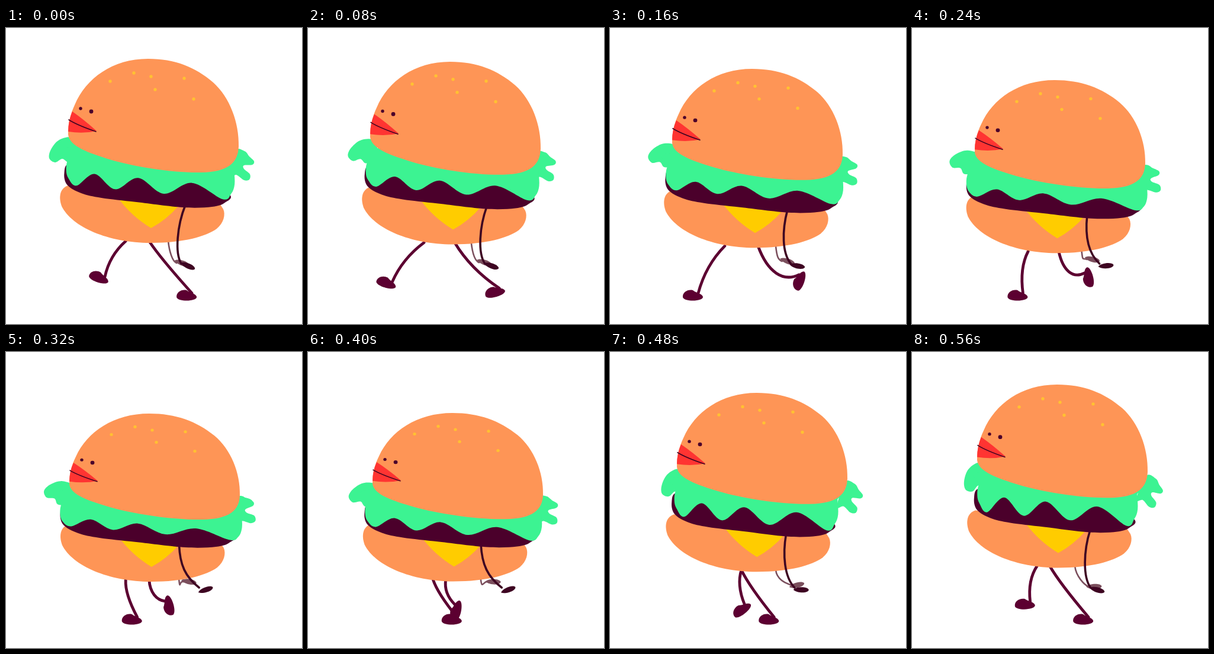
Animation, 500 px wide and 500 px high, one loop 640 ms. Source, as an HTML page with a canvas:

```html
<!DOCTYPE html>
<html lang="en">
<head>
<meta charset="utf-8">
<title>Walking burger</title>
<style>
  html, body { margin: 0; width: 100%; height: 100%; overflow: hidden; background: #fff; }
  canvas { display: block; width: 100vw; height: 100vh; object-fit: contain; }
</style>
</head>
<body>
<canvas id="stage" width="500" height="500"></canvas>
<script>
const ctx = document.getElementById('stage').getContext('2d');
const STEP = 80, STEPS = 8, CENTER = 240;
const ORANGE = '#fe9556', GREEN = '#3cf392', YELLOW = '#ffcc00', RED = '#ff3432',
      SEED = '#ffc132', PATTY = '#4b002b', LEG = '#5c0031', ARM = '#3e0522', FAR_ARM = '#7b4f5d';

// How far the top of the body has sunk and leaned back at each step.
const DROP = [0, 5, 17, 36, 52, 51, 17, 3];
const LEAN = [0, 0, 0, 1, 2, 4, 8, 5];

const bun = new Path2D('M105 180C105 160 109 145 116 130C135 85 180 52 240 52' +
  'C285 52 320 66 350 92C378 117 394 160 393 200C392 228 375 243 330 244' +
  'C280 245 215 234 175 222C140 211 107 200 105 180Z');
const base = new Path2D('M105 266C88 272 90 290 94 301C111 336 173 363 244 363' +
  'C300 363 338 352 356 339C368 329 371 315 367 306L360 295Z');
const cheese = new Path2D('M190 288L291 301Q271 324 245 338Q212 318 190 288Z');
const patty = smooth([105, 229, 96, 245, 101, 265, 125, 279, 160, 287, 220, 294,
  300, 303, 350, 302, 372, 295, 380, 281, 330, 252, 150, 235]);
const leafLeft = smooth([112, 186, 90, 189, 76, 205, 73, 220, 83, 227, 95, 221, 106, 226, 122, 212]);
const leafRight = smooth([386, 207, 403, 208, 411, 217, 419, 225, 416, 231, 402, 232,
  402, 238, 412, 247, 411, 256, 402, 257, 389, 248, 378, 250]);
const lips = new Path2D('M112 141Q132 155 153 174Q130 179 105 175Q105 157 112 141Z');
const mouth = new Path2D('M106 155Q120 164 152 175');
const foot = new Path2D('M-17 3C-18 -6 -8 -11 0 -9C6 -4 15 -4 17 2C18 10 -14 11 -17 3Z');
const hand = new Path2D('M-13 -1C-8 -6 10 -6 13 0C13 6 -6 6 -13 -1Z');
const eyes = [[126, 136, 2.7], [144, 141, 3.4]];
const seeds = [[176, 90], [216, 76], [245, 82], [252, 104], [301, 85], [317, 120]];

// Closed Catmull-Rom curve through a flat list of coordinates.
function smooth(v) {
  const path = new Path2D(), count = v.length / 2;
  const point = i => {
    const k = 2 * ((i + count) % count);
    return [v[k], v[k + 1]];
  };
  path.moveTo(...point(0));
  for (let i = 0; i < count; i++) {
    const [a, b, c, d] = [i - 1, i, i + 1, i + 2].map(point);
    path.bezierCurveTo(b[0] + (c[0] - a[0]) / 6, b[1] + (c[1] - a[1]) / 6,
      c[0] - (d[0] - b[0]) / 6, c[1] - (d[1] - b[1]) / 6, ...c);
  }
  return path;
}

function fill(shape, color) {
  ctx.fillStyle = color;
  ctx.fill(shape);
}

function stroke(shape, color, width) {
  ctx.strokeStyle = color;
  ctx.lineWidth = width;
  ctx.stroke(shape);
}

function dot([x, y, r = 2.7], color) {
  const path = new Path2D();
  path.arc(x, y, r, 0, Math.PI * 2);
  fill(path, color);
}

function placed(dx, dy, draw) {
  ctx.save();
  ctx.translate(dx, dy);
  draw();
  ctx.restore();
}

function stretched(factor, draw) {
  ctx.translate(CENTER, 0);
  ctx.scale(factor, 1);
  ctx.translate(-CENTER, 0);
  draw();
}

function turned(shape, color, degrees, x = 0, y = 0) {
  ctx.save();
  ctx.translate(x, y);
  ctx.rotate(degrees * Math.PI / 180);
  ctx.translate(-x, -y);
  fill(shape, color);
  ctx.restore();
}

function drawLimb(curve, color, width, end, x, y, angle) {
  const path = new Path2D();
  path.moveTo(curve[0], curve[1]);
  path.bezierCurveTo(...curve.slice(2));
  stroke(path, color, width);
  placed(x, y, () => turned(end, color, angle));
}

// One leg's stride lasts two loops: planted from u = 2 to 10, then swung forward.
function drawLeg(u, drop) {
  u = (u + 14) % 16 + 2;
  const s = (u - 2) % 8 / 8;
  const x = u < 10 ? 320 - 180 * (1 - s) ** 1.8
                   : 320 - 180 * (s + 2.6 * s ** 5 * (1 - s));
  const q = Math.PI * Math.max(0, (u - 8.75) / 9.25);
  const lift = 29 * Math.sin(q) + 14 * Math.sin(3 * q);
  const angle = -65 * Math.sin(q) - 60 * Math.sin(2 * q);
  const y = 452 - lift;

  const a = angle * Math.PI / 180;
  const ankleX = x + 9 * Math.cos(a) + 4 * Math.sin(a);
  const ankleY = y + 9 * Math.sin(a) - 4 * Math.cos(a);
  const hipX = 222 - 28 * Math.cos(Math.PI * (u - 2) / 8), hipY = 360 + 0.48 * drop;
  const dx = ankleX - hipX, dy = ankleY - hipY;
  const kick = 0.8 * lift * Math.max(0, dx) / 47;
  drawLimb([hipX, hipY,
    hipX + 0.35 * dx - 8, hipY + 0.3 * dy + kick,
    ankleX - 0.3 * dx - 6, ankleY - 0.35 * dy + kick,
    ankleX, ankleY], LEG, 4.8, foot, x, y, angle);
}

function drawNearArm(drop, lean) {
  const reach = 0.55 * drop + 0.8 * lean;
  const x = 307 + reach, y = 402;
  const topX = 303 - 0.35 * reach, topY = 299 + 0.5 * drop;
  drawLimb([topX, topY, topX - 14 + 0.5 * reach, topY + 35,
    x - 22 - 0.4 * reach, y - 22, x - 11, y - 4], ARM, 3.6, hand, x, y, 20 - 1.4 * reach);
}

function drawFarArm(drop, lean) {
  const x = 297 + 0.15 * drop + 2 * lean, y = 397 - 0.17 * drop;
  const topX = 274 + 0.35 * drop, topY = 360 + 0.48 * drop;
  drawLimb([topX, topY, topX + 2, topY + 18, x - 16, y - 3, x - 9, y],
    FAR_ARM, 2.6, hand, x, y, 15 - 4 * lean);
}

// The hem waves around a gently sloping line, with wider waves to the right.
function lettuce(swing) {
  const hem = [], amp = 10 - 0.08 * swing;
  for (let i = 0; i < 7; i++) {
    const x = 116 + 29 * i + 2.2 * i * i;
    hem.push(x, 255 + 0.09 * (x - 116) + (i % 2 ? -amp : amp));
  }
  return smooth([115, 200, 101, 222, 98, 240, 102, 254, ...hem,
    384, 280, 390, 264, 389, 240, 386, 212]);
}

function drawBun(drop, lean) {
  const squash = 1 - 0.25 * drop / 192;
  placed(lean, 52 + drop, () => {
    ctx.scale(1, squash);
    ctx.translate(0, -52);
    fill(bun, ORANGE);
    seeds.forEach(seed => dot(seed, SEED));
    fill(lips, RED);
    stroke(mouth, ARM, 1.6);
    eyes.forEach(eye => dot(eye, PATTY));
  });
}

function draw(step) {
  const drop = DROP[step], lean = LEAN[step];
  // Soft parts bulge and flap with the recent fall or rise of the body.
  const swing = drop - DROP[(step + STEPS - 2) % STEPS];
  const flap = swing + 17;
  ctx.fillStyle = '#fff';
  ctx.fillRect(0, 0, 500, 500);
  ctx.lineCap = 'round';

  drawFarArm(drop, lean);
  drawLeg(step + STEPS, drop);
  drawLeg(step, drop);
  placed(0.4 * lean, 0.48 * drop, () => {
    fill(base, ORANGE);
    fill(cheese, YELLOW);
  });
  drawNearArm(drop, lean);
  placed(0.4 * lean, 0.52 * drop, () =>
    stretched(1 + 0.001 * swing, () => fill(patty, PATTY)));
  placed(lean, 0.75 * drop, () => {
    turned(leafLeft, GREEN, 0.65 * flap, 108, 190);
    turned(leafRight, GREEN, -0.4 * flap, 388, 228);
  });
  placed(0.4 * lean, 0.62 * drop, () =>
    stretched(1 + 0.0015 * swing, () => fill(lettuce(swing), GREEN)));
  drawBun(drop, lean);
}

const start = performance.now();
function frame() {
  draw(Math.floor((performance.now() - start) / STEP) % STEPS);
  requestAnimationFrame(frame);
}
frame();
</script>
</body>
</html>
```
